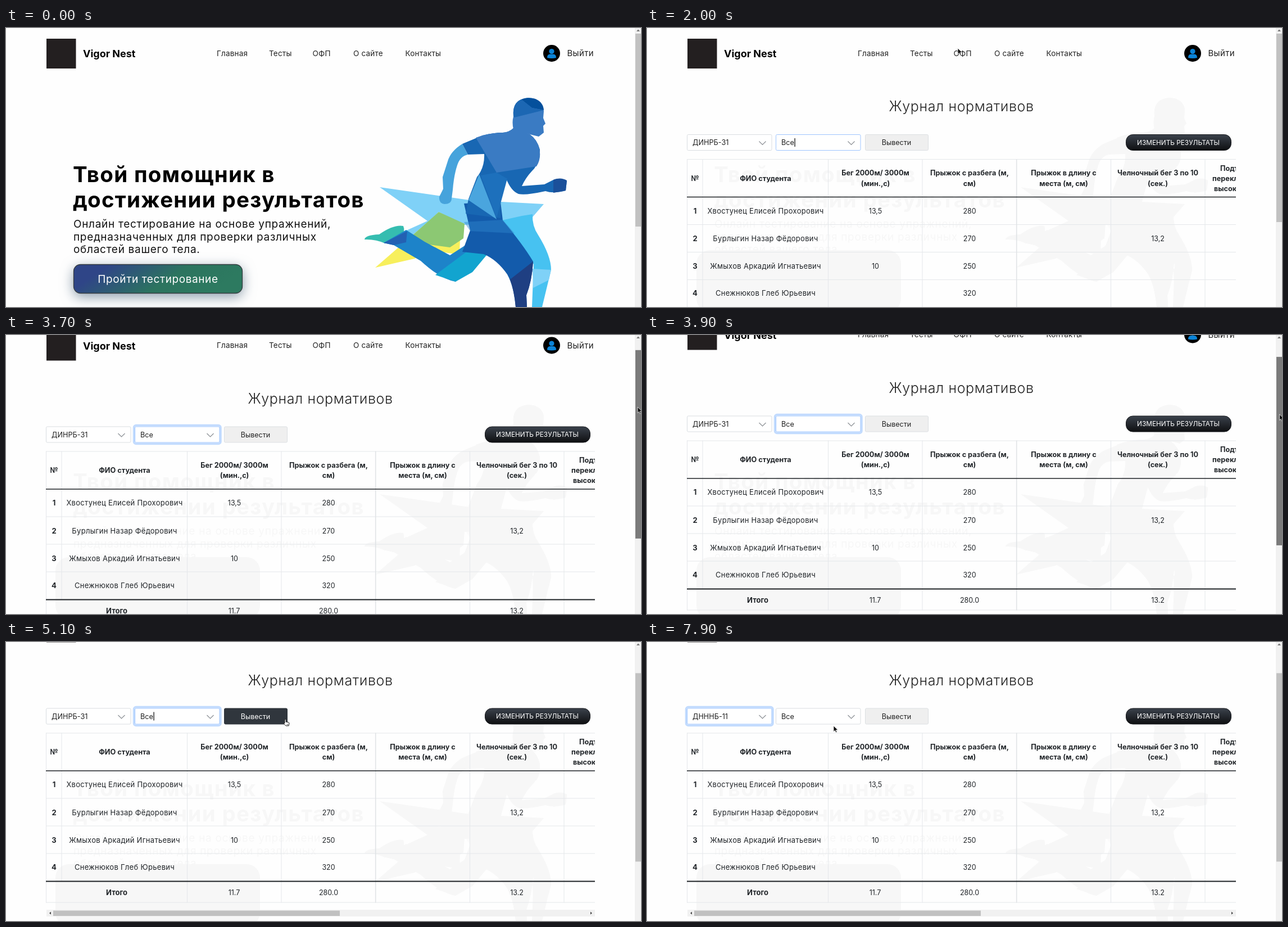
Recreate the animation shown at these times as an HTML page. Size 1130 by 496 pixels, loop 8 s.

```html
<!DOCTYPE html>
<html lang="ru">
<head>
<meta charset="utf-8">
<style>
  html, body { margin: 0; width: 100%; height: 100%; overflow: hidden; background: #fefefe; }
  svg { display: block; font-family: Inter, "Noto Sans", sans-serif; }
  .shadow { filter: drop-shadow(0 6px 11px rgba(50, 80, 105, .55)); }
  .ghost { filter: brightness(0); opacity: .03; }
</style>
</head>
<body>
<svg width="1130" height="496" viewBox="0 0 1130 496">
  <defs>
    <linearGradient id="cta" x2="1" y2=".25">
      <stop offset=".2" stop-color="#2f4587"/><stop offset=".65" stop-color="#2c745f"/><stop offset="1" stop-color="#2d7a60"/>
    </linearGradient>
    <linearGradient id="dark" x2="0" y2="1">
      <stop offset="0" stop-color="#3b424c"/><stop offset="1" stop-color="#0e0f11"/>
    </linearGradient>
    <clipPath id="tableClip"><path d="M71 232H1048V536H71z"/></clipPath>
    <g id="runner">
      <path fill="#7fd1f7" d="M665 283L825 306 957 313 925 350 940 400 885 346 815 350 770 327 712 384 699 366 750 343z"/>
      <path fill="#f7ef5c" d="M657 426L770 328 808 376 807 403 760 396 727 410z"/>
      <path fill="#8cc873" d="M770 327L816 348 814 374 790 390 745 384 722 370z"/>
      <path fill="#47c2f1" d="M882 342L918 334 937 331Q936 352 947 368 970 405 970 430L954 496H936L939 420z"/>
      <path fill="#7fd1f7" d="M937 428L970 430 966 448 938 462z"/>
      <path fill="#35bdb0" d="M638 376Q639 368 664 367 690 349 707 352 711 361 703 371L675 383Q657 375 638 376z"/>
      <path fill="#1d83c9" d="M672 382L712 359 745 380 790 404 830 378 860 398 800 451Q774 447 738 414L690 386z"/>
      <path fill="#2361b3" d="M672 382L714 361 712 381 690 386z"/>
      <path fill="#12a4cf" d="M764 439L822 396 860 398 830 434 800 451z"/>
      <path fill="#135bab" d="M815 312L880 309 884 342Q920 385 938 415 936 450 926 475L927 496H907Q904 460 892 438 874 412 850 402L812 398 826 360z"/>
      <path fill="#1f3f82" d="M897 447L938 415Q936 450 926 475L927 496H907Q904 466 897 447z"/>
      <path fill="#46a3dc" d="M812 206Q791 219 786 237L777 265 778 286 771 300Q770 312 780 313 793 313 793 303L795 288Q797 262 803 244 808 228 822 225z"/>
      <path fill="#1867b3" d="M903 178Q896 185 884 186 868 186 848 191L812 206 822 225 851 224Q852 248 838 265L823 304 818 330 880 338 880 309Q883 290 890 268 899 290 912 295 924 298 960 290 974 295 996 289L998 272Q990 266 976 269L958 278 918 281Q925 265 940 250 951 234 950 216 945 198 932 189z"/>
      <path fill="#3a7bc3" d="M903 178Q896 185 884 186 868 186 848 191L836 195 873 257 944 246Q953 232 949 214 945 198 932 189z"/>
      <path fill="#4aa5de" d="M842 260L873 340 823 306z"/>
      <path fill="#1d70bc" d="M845 262L873 257 892 268 873 338z"/>
      <path fill="#1b509a" d="M974 270L980 268Q990 266 998 271L996 289 974 293z"/>
      <path fill="#3a7bc3" d="M903 180Q900 168 903 157 900 127 928 124 955 124 957 148L956 160 960 170 956 174 957 186 948 193 932 189z"/>
      <path fill="#04509c" d="M917 127Q928 122 942 126 956 132 957 146L936 142z"/>
      <path fill="#1c67b3" d="M903 157Q901 133 917 127L936 142 957 146 905 159z"/>
      <path fill="#2f86cd" d="M815 345L884 341 905 365 826 361z" opacity=".45"/>
    </g>
  </defs>
  <g id="stage"></g>
</svg>
<script>
const LOOP = 8000, STEP = 100;
const stage = document.getElementById('stage');

// Cursor path: time, x, y of the tip, shape
const path = [
  [300, 1092, 25, 'arrow'], [400, 985, 42, 'arrow'], [500, 938, 28, 'arrow'], [700, 794, 33, 'arrow'],
  [1000, 645, 38, 'arrow'], [1100, 550, 33, 'arrow'], [1200, 553, 36, 'hand'], [1700, 553, 36, 'arrow'],
  [2200, 553, 36, 'arrow'], [2300, 625, 52, 'arrow'], [2500, 742, 82, 'arrow'], [2900, 940, 108, 'arrow'],
  [3100, 1092, 108, 'arrow'], [3200, 1124, 110, 'arrow'], [3700, 1124, 128, 'arrow'], [4100, 1127, 154, 'arrow'],
  [4300, 1127, 158, 'arrow'], [4500, 1040, 140, 'arrow'], [4700, 835, 107, 'arrow'], [4900, 714, 140, 'arrow'],
  [5100, 495, 137, 'hand'], [5300, 430, 137, 'hand'], [5400, 384, 136, 'arrow'], [5500, 357, 133, 'beam'],
  [5800, 357, 133, 'beam'], [6200, 204, 135, 'beam'], [6900, 204, 135, 'beam'], [7000, 190, 150, 'arrow'],
  [7200, 155, 184, 'arrow'], [7400, 155, 184, 'arrow'], [7600, 190, 172, 'arrow'], [7800, 292, 155, 'arrow'],
  [7900, 332, 149, 'arrow']
];
const scrollKeys = [[3100, 0], [3700, 26.5], [4100, 64.5], [4200, 71.5]];

function at(keys, t, col = 1) {
  const i = keys.findIndex(k => k[0] > t);
  if (i < 0) return keys[keys.length - 1][col];
  if (!i) return keys[0][col];
  const a = keys[i - 1], b = keys[i];
  return a[col] + (b[col] - a[col]) * (t - a[0]) / (b[0] - a[0]);
}

const rect = (x, y, w, h, fill, more = '') =>
  `<rect x="${x}" y="${y}" width="${w}" height="${h}" fill="${fill}" ${more}/>`;
const line = (d, color, width = 1) => `<path d="${d}" fill="none" stroke="${color}" stroke-width="${width}"/>`;
// y is the middle of the capitals
const text = (x, y, s, size, more = '') =>
  `<text x="${x}" y="${y + size * .364}" font-size="${size}" ${more}>${s}</text>`;
const centered = (x, y, s, size = 13, more = '') => text(x, y, s, size, 'text-anchor="middle" ' + more);
const bold = 'font-weight="700"';

function header(hover) {
  const nav = [[375, 'Главная'], [468, 'Тесты'], [545.5, 'ОФП'], [618, 'О сайте'], [710.5, 'Контакты']];
  return rect(72, 19, 52.5, 53, '#231f20') +
    text(137, 45.5, 'Vigor Nest', 18, bold) +
    nav.map(([x, s]) => text(x, 45, s, 13.5, 'fill="#222" letter-spacing=".2"')).join('') +
    (hover ? rect(545.5, 51, 35 * hover, 1, '#222') : '') +
    '<circle cx="971" cy="45" r="15"/><circle cx="971" cy="41.5" r="4.6" fill="#0b84d8"/>' +
    '<path d="M963 53Q963 46.500 968 46.500H974Q979 46.500 979 53Q971 55 963 53z" fill="#0b84d8"/>' +
    text(998.5, 45, 'Выйти', 15, 'fill="#222" letter-spacing=".3"');
}

function hero() {
  const h = bold + ' letter-spacing="1.3"', p = 'fill="#111" letter-spacing=".7"';
  return '<use href="#runner"/>' +
    text(119, 259.5, 'Твой помощник в', 38.5, h) +
    text(119, 304.5, 'достижении результатов', 38.5, h) +
    text(120, 348.5, 'Онлайн тестирование на основе упражнений,', 19, p) +
    text(120, 371, 'предназначенных для проверки различных', 19, p) +
    text(120, 393.5, 'областей вашего тела.', 19, p) +
    rect(120.5, 420.5, 300, 51, 'url(#cta)', 'rx="12" stroke="#363c40" stroke-width="1.3" class="shadow"') +
    centered(270.5, 446, 'Пройти тестирование', 19, 'fill="#fff" letter-spacing=".6"');
}

function select(x, value, focus, caretX) {
  const ring = focus > .5 ? rect(x - 2, 187, 154.5, 33, 'none', 'rx="4" stroke="#c2dbfe" stroke-width="3.5"') : '';
  return ring + rect(x, 189.5, 150.5, 28, '#fff', `rx="2" stroke="${focus ? '#9ec5fe' : '#d9dde1'}"`) +
    text(x + 9.5, 203.5, value, 12.7, 'fill="#222"') +
    line(`M${x + 128} 201.500l6 6 6-6`, '#8b8f94', 1.2) +
    (caretX ? rect(caretX, 196, 1.2, 15, '#000') : '');
}

function dropdown(x, items, active) {
  return items.map((s, i) =>
    rect(x, 218 + i * 27.5, 150.5, 27.5, i === active ? '#dadada' : '#f3f5f5') +
    text(x + 9.5, 231.7 + i * 27.5, s, 12.7, 'fill="#333"')).join('') +
    rect(x, 218, 150.5, items.length * 27.5, 'none', 'stroke="#dfe3e6"');
}

const heads = [
  [85.5, '№'], [211, 'ФИО студента'], [406.5, 'Бег 2000м/ 3000м', '(мин.,с)'],
  [574, 'Прыжок с разбега (м,', 'см)'], [741.5, 'Прыжок в длину с', 'места (м, см)'],
  [909, 'Челночный бег 3 по 10', '(сек.)']
];
const rows = [
  [325, 'Хвостунец Елисей Прохорович', '13,5', '280', ''],
  [374.5, 'Бурлыгин Назар Фёдорович', '', '270', '13,2'],
  [423.5, 'Жмыхов Аркадий Игнатьевич', '10', '250', ''],
  [471.5, 'Снежнюков Глеб Юрьевич', '', '320', '']
];

function table() {
  const grey = '#e4e7ea', ink = '#1d2124', headSize = 12.7;
  let s = line('M71 233.500H1048M71 349.500H1048M71 398.500H1048M71 447.500H1048M71 534.500H1048', grey) +
    line('M71.500 233V535M99 233V497M322.500 233V535M490 233V535M825.500 233V535M993 233V535', grey) +
    line('M657.700 233V535', '#e0e3e6', 1.6) +
    line('M71 300.500H1048', ink, 1.4) + line('M71 497H1048', ink, 2);
  for (const [x, ...lines] of heads)
    lines.forEach((l, i) => s += centered(x, 267 + (i - (lines.length - 1) / 2) * 18.5, l, headSize, bold));
  s += text(1020, 249, 'Подтягивания', headSize, bold) + text(1006, 267, 'перекладине', headSize, bold) +
    text(1009, 285, 'высокой', headSize, bold);
  rows.forEach(([y, name, run, jump, shuttle], i) => s += centered(85.5, y, i + 1, 13, bold) +
    centered(211, y, name, 13, 'letter-spacing=".3"') + centered(406.5, y, run, 12.5) +
    centered(574, y, jump, 12.5) + centered(909, y, shuttle, 12.5));
  s += centered(197, 516.5, 'Итого', 13, bold) + centered(406, 516.5, '11.7', 12.5) +
    centered(574, 516.5, '280.0', 12.5) + centered(909, 516.5, '13.2', 12.5);
  return `<g clip-path="url(#tableClip)" fill="#212529">${s}</g>` +
    rect(72, 547.5, 976, 12, '#f1f1f1') + rect(84, 549, 510, 9.5, '#c1c1c1') +
    '<path d="M80 551v5l-3-2.500zM1040 551v5l3-2.500z" fill="#444"/>';
}

function journal(t) {
  const first = t >= 6400, picked = t >= 7400;
  const since = t - (picked ? 7400 : t >= 6500 ? 6500 : 2000);
  const caret = Math.floor(since / 500) % 2 === 0;
  const hot = t >= 5100 && t < 5400;
  const group = picked ? 'ДНННБ-11' : 'ДИНРБ-31';
  return header(0) +
    centered(559.5, 139, 'Журнал нормативов', 25, 'fill="#222" font-weight="300" letter-spacing=".6"') +
    table() +
    select(71.5, group, first ? 1 : 0, first && caret && 143.5) +
    select(229.5, 'Все', first ? 0 : t < 2100 ? .4 : 1, !first && caret && 262.5) +
    rect(388.5, 189.5, 112, 28, hot ? '#30363d' : '#efefef', `rx="2" stroke="${hot ? '#30363d' : '#dcdfe2'}"`) +
    centered(444, 203.5, 'Вывести', 12.5, `fill="${hot ? '#fff' : '#222'}"`) +
    rect(852.5, 189.5, 187, 28, 'url(#dark)', 'rx="12" stroke="#17191c"') +
    centered(945.5, 203.3, 'ИЗМЕНИТЬ РЕЗУЛЬТАТЫ', 11.8, 'fill="#fff"') +
    (t >= 5600 && t < 6400 ? dropdown(229.5, ['Все', 'Мужской', 'Женский'], 0) : '') +
    (t >= 6500 && !picked ? dropdown(71.5, ['ДИНРБ-31', 'ДНННБ-11'], t >= 7200 ? 1 : 0) : '');
}

function scrollbar(top, height, color) {
  return rect(1119, 0, 11, 496, '#f1f1f1') + rect(1120, top, 10, height, color) +
    '<path d="M1122 6h6l-3-3.500z" fill="#777"/>';
}

const shapes = {
  arrow: '<path d="M0 0V10.500L2.500 8.300 4.200 12 6 11.200 4.400 7.600H7.800z" fill="#111" stroke="#fff" stroke-width=".7"/>',
  hand: '<path d="M1 1Q2.200-.500 3.200 1V5L8 6Q9.300 6.500 9 8L8 12H3L-.800 8Q-1 6.300 1 7.300z" fill="#fff" stroke="#222"/><path d="M5 9v2M6.700 9v2" stroke="#222" stroke-width=".7"/>',
  beam: '<path d="M-2.500-5H2.500M0-5V5M-2.500 5H2.500" stroke="#222" stroke-width="1.100"/>'
};

function cursor(t) {
  if (t < 300) return '';
  const shape = path.filter(k => k[0] <= t).pop()[3];
  return `<g transform="translate(${at(path, t, 1)} ${at(path, t, 2)})">${shapes[shape]}</g>`;
}

function scene(t) {
  if (t < 1900) {
    const hover = Math.min(1, Math.max(0, (t - 1100) / 300));
    return header(hover) + hero() + scrollbar(10, 343, '#c1c1c1') + cursor(t);
  }
  const y = at(scrollKeys, t), dragging = t >= 3200 && t < 4400;
  return `<g class="ghost">${hero()}${rect(88, 395, 364, 110, '#000', 'rx="24"')}</g>` +
    `<g transform="translate(0 ${-y})">${journal(t)}</g>` +
    scrollbar(10 + y * .635, 335, dragging ? '#7b7b7b' : '#c1c1c1') + cursor(t);
}

let shown = -1;
function tick(now) {
  const t = Math.floor(now % LOOP / STEP) * STEP;
  if (t !== shown) stage.innerHTML = scene(shown = t);
  requestAnimationFrame(tick);
}
tick(performance.now());
</script>
</body>
</html>
```
